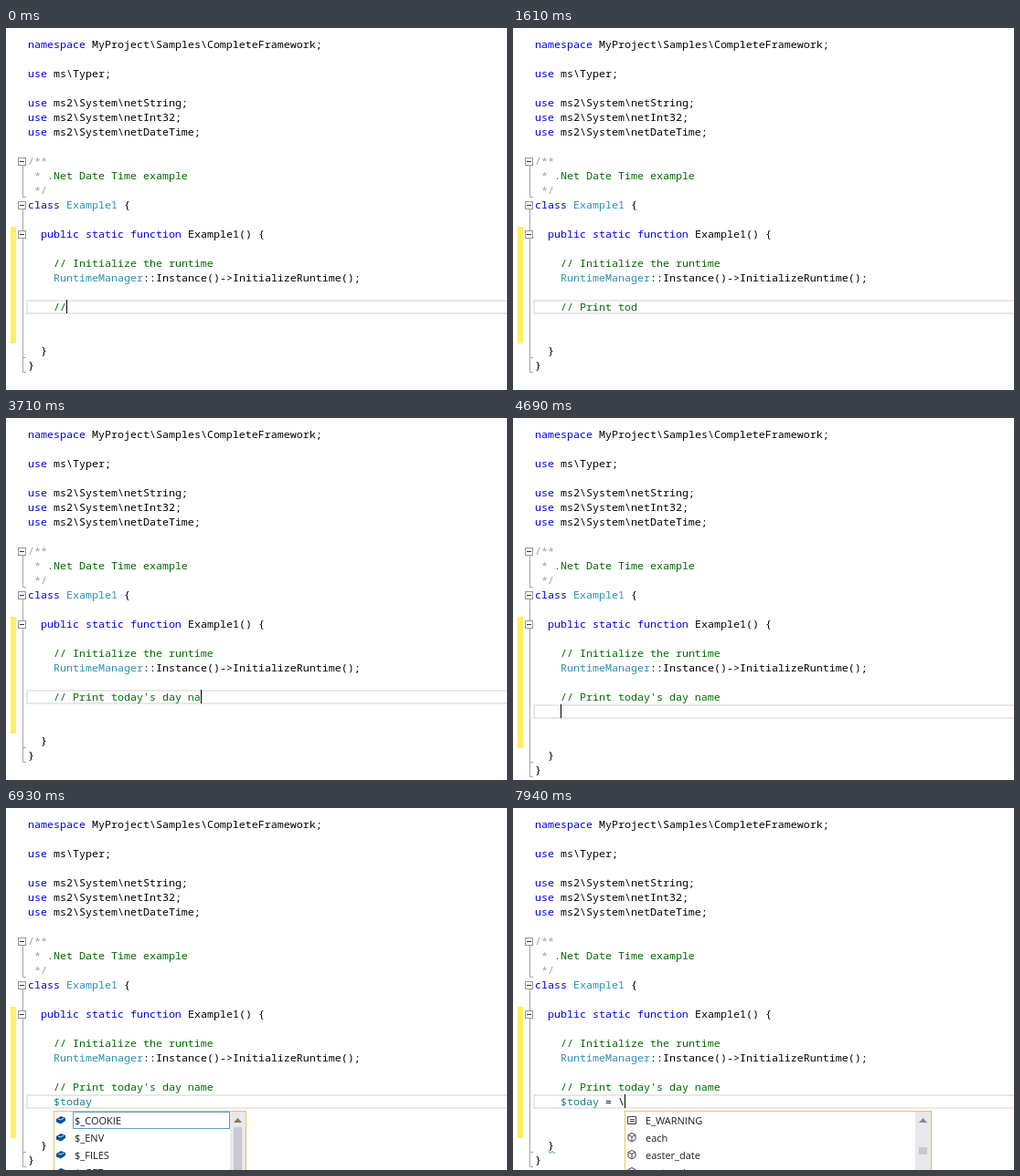
Recreate the animation shown at these times as an HTML page. Size 548 by 397 pixels, loop 8 s.

```html
<!DOCTYPE html>
<html lang="en">
<head>
<meta charset="utf-8">
<title>Code editor typing</title>
<style>
  html, body { margin: 0; width: 100%; height: 100%; overflow: hidden; background: #fff; }
  svg { display: block; }
  text { white-space: pre; }
  .code { font: 11.667px "Noto Sans Mono", "DejaVu Sans Mono", monospace; }
  .item { font: 11px "Open Sans", "Noto Sans", sans-serif; fill: #1e1e1e; }
</style>
</head>
<body>
<svg id="stage" width="548" height="397" viewBox="0 0 548 397"></svg>
<script>
const LOOP = 8000, STEP = 70, CHAR = 7, ROW = 16, LEFT = 24, TOP = 10;
const BLUE = '#0000e6', TEAL = '#2b91af', GREEN = '#006a00', GRAY = '#a0a0a0', BLACK = '#000';
const COMMENT = "// Print today's day name";
const STATEMENT = '$today = \\';
const stage = document.getElementById('stage');

function add(parent, tag, attrs, content = '') {
  const el = document.createElementNS('http://www.w3.org/2000/svg', tag);
  for (const key in attrs) el.setAttribute(key, attrs[key]);
  el.textContent = content;
  return parent.appendChild(el);
}
const rect = (parent, x, y, width, height, fill) => add(parent, 'rect', { x, y, width, height, fill });
const path = (parent, d, stroke, fill = 'none') => add(parent, 'path', { d, stroke, fill });
const group = () => add(stage, 'g', {});
const show = (el, on) => el.setAttribute('visibility', on ? 'visible' : 'hidden');

// Writes coloured pieces, given as color, text, color, text...
function code(parent, row, col, ...parts) {
  let el;
  for (let i = 0; i < parts.length; i += 2) {
    el = add(parent, 'text', {
      class: 'code', x: LEFT + col * CHAR, y: TOP + row * ROW + 12, fill: parts[i]
    }, parts[i + 1]);
    col += parts[i + 1].length;
  }
  return el;
}

// Current line frame
const lineBox = add(stage, 'rect', { x: 23, width: 540, height: 14, fill: 'none', stroke: '#e8e8ea', 'stroke-width': 2 });

// Change bar and outline margin
const bar = rect(stage, 5, 218, 6, 128, '#ffee62');
const outline = path(stage, '', '#a5a5a5');
for (const y of [142, 190, 222]) {
  add(stage, 'rect', { x: 13.5, y: y + 0.5, width: 8, height: 8, fill: '#fff', stroke: '#949494' });
  rect(stage, 15, y + 4, 5, 1, '#333');
}

// Code
code(stage, 0, 0, BLUE, 'namespace', BLACK, String.raw` MyProject\Samples\CompleteFramework;`);
[[2, String.raw` ms\Typer;`], [4, String.raw` ms2\System\netString;`],
 [5, String.raw` ms2\System\netInt32;`], [6, String.raw` ms2\System\netDateTime;`]]
  .forEach(([row, name]) => code(stage, row, 0, BLUE, 'use', BLACK, name));
code(stage, 8, 0, GRAY, '/**');
code(stage, 9, 1, GRAY, '* ', GREEN, '.Net Date Time example');
code(stage, 10, 1, GRAY, '*/');
code(stage, 11, 0, BLUE, 'class', BLACK, ' ', TEAL, 'Example1', BLACK, ' {');
code(stage, 13, 2, BLUE, 'public static function', BLACK, ' Example1() {');
code(stage, 15, 4, GREEN, '// Initialize the runtime');
code(stage, 16, 4, TEAL, 'RuntimeManager', BLACK, '::Instance()->InitializeRuntime();');
const comment = code(stage, 18, 4, GREEN, '');
const variable = code(stage, 19, 4, TEAL, '');
const rest = code(stage, 19, 10, BLACK, '');
const tail = group();
code(tail, 21, 2, BLACK, '}');
code(tail, 22, 0, BLACK, '}');
const squiggle = path(stage, 'M39 376.5l2 2 2-2 2 2 1-1', '#2f8f2f');
const caret = rect(stage, 0, 0, 1, 15, '#000');

// Completion lists
const icons = {
  field(g, x, y) {
    path(g, `M${x - 5} ${y - 1}l5-3 5 2v3l-5 3.500-5-2z`, 'none', '#00539c');
    path(g, `M${x - 3} ${y - 1}l3 1 3-1.800`, '#cfe0f0');
  },
  constant(g, x, y) {
    path(g, `M${x - 4.5} ${y - 3.5}h9v8h-9z`, '#424242');
    path(g, `M${x - 2} ${y - 0.5}h5M${x - 2} ${y + 1.5}h5`, '#424242');
  },
  method(g, x, y) {
    path(g, `M${x} ${y - 4.5}l4 2v5l-4 2.500-4-2.500v-5zM${x - 4} ${y - 2.5}l4 2 4-2M${x} ${y - 0.5}v5`, '#4a3a5c');
  }
};

function popup(x, width, items, thumbY, thumbH, selected) {
  const g = group(), right = x + width;
  add(g, 'rect', { x: x + 0.5, y: 332.5, width: width - 1, height: 180, fill: '#fff', stroke: '#e5c365' });
  rect(g, right - 18, 333, 17, 80, '#e8e8ec');
  path(g, `M${right - 14} 345l4.500-5 4.500 5z`, 'none', selected ? '#8a7a4a' : '#868999');
  rect(g, right - 14, thumbY, 9, thumbH, '#c8c9ce');
  if (selected) add(g, 'rect', { x: x + 21.5, y: 333.5, width: 171, height: 18, fill: '#fff', stroke: '#4f9fd8' });
  items.forEach(([icon, label], i) => {
    const y = 342 + 19 * i;
    icons[icon](g, x + 8, y);
    add(g, 'text', { class: 'item', x: x + 23, y: y + 4.5 }, label);
  });
  return g;
}
const globals = popup(52, 211,
  ['$_COOKIE', '$_ENV', '$_FILES', '$_GET'].map(name => ['field', name]), 350, 60, true);
const symbols = popup(122, 336,
  [['constant', 'E_WARNING'], ['method', 'each'], ['method', 'easter_date'], ['method', 'easter_days']], 372, 8, false);

// Each run: start time, then the typed length at every step; negative hides the caret.
const runs = [
  [0, 2], [210, -2, 3], [420, 4], [700, -4, 5, 6, 7, 8, 9, 10],
  [1260, 9, 10, -10, 11, 12, -12, -13], [1960, 13], [2170, 14], [2450, 15],
  [2590, 16, -17], [2870, 17], [3150, -17], [3290, 18, 19, 20, 21],
  [3640, 22, 23], [3850, 24, 25], [4550, -25], [4690, 26], [5040, -26, 26],
  [5530, -26], [6020, 26], [6440, 27], [6650, 28, 29, 30, 31, -32],
  [7070, -33, 33], [7350, 34, 35], [7870, 36]
];

function typedAt(t) {
  const [start, ...lengths] = runs.findLast(run => run[0] <= t);
  return lengths[Math.min(lengths.length - 1, Math.floor((t - start) / STEP))];
}

function draw(t) {
  const state = typedAt(t), count = Math.abs(state);
  const second = count > COMMENT.length;
  const length = second ? count - COMMENT.length - 1 : count;
  const shift = second ? ROW : 0;
  const typed = second ? STATEMENT.slice(0, length) : '';

  comment.textContent = COMMENT.slice(0, count);
  variable.textContent = typed.slice(0, 6);
  variable.setAttribute('fill', length > 1 ? '#16818f' : BLACK);
  rest.textContent = typed.slice(6);

  lineBox.setAttribute('y', 299 + shift);
  bar.setAttribute('height', 128 + shift);
  outline.setAttribute('d', `M18.5 151V185.5H22M18.5 199V${377.5 + shift}H22M18.5 ${361.5 + shift}H22`);
  tail.setAttribute('transform', `translate(0 ${shift})`);
  caret.setAttribute('x', 52 + length * CHAR);
  caret.setAttribute('y', 298 + shift);

  show(caret, state > 0);
  show(globals, t >= 6510 && t < 7070);
  show(squiggle, t >= 7210);
  show(symbols, t >= 7940);
}

const begin = performance.now();
function tick() {
  draw((performance.now() - begin) % LOOP);
  requestAnimationFrame(tick);
}
tick();
</script>
</body>
</html>
```
